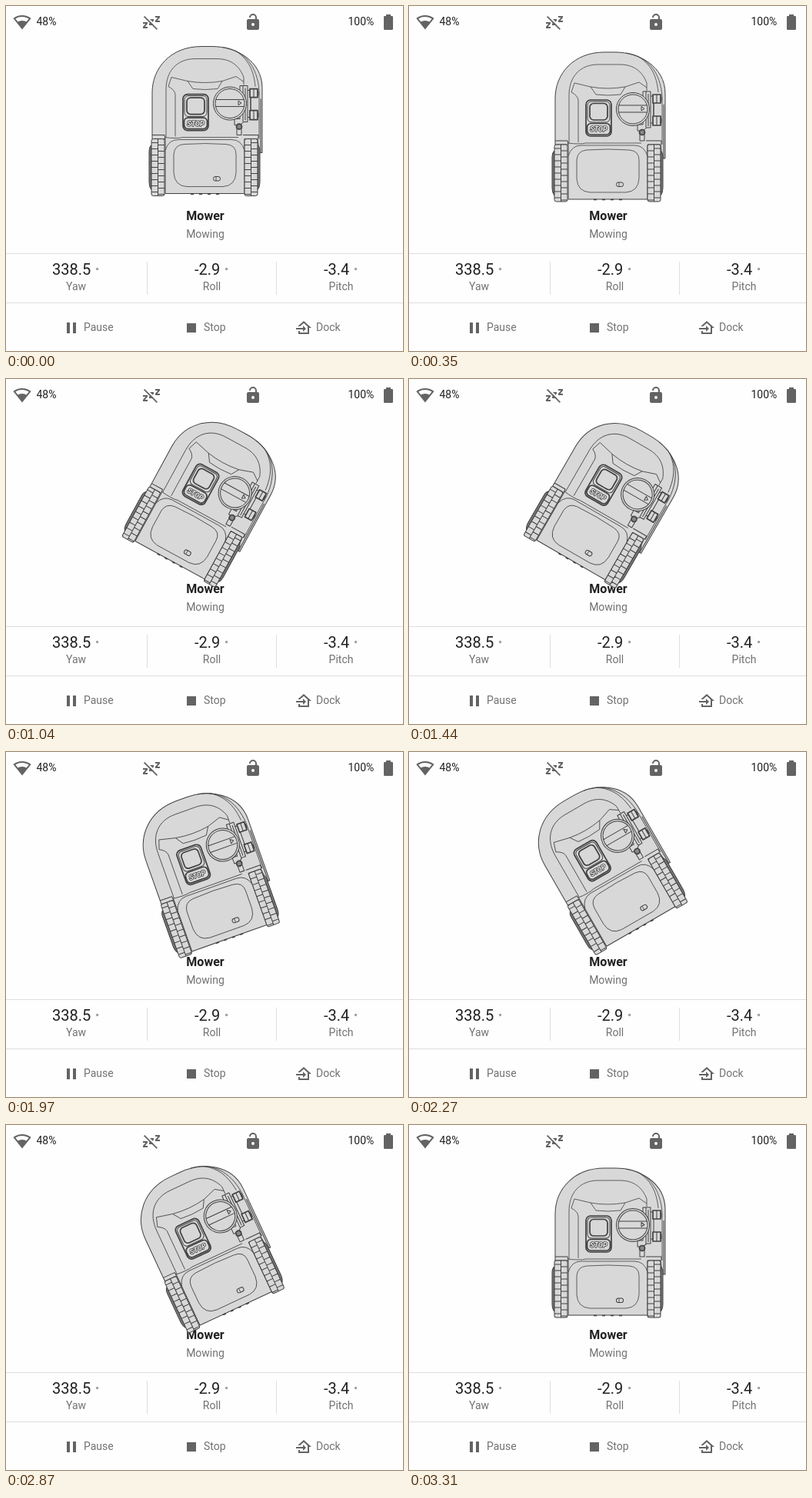
These frames come from a looping animation (516 by 448 pixels, 4390 ms). An HTML page:

```html
<!DOCTYPE html>
<html lang="en">
<head>
<meta charset="utf-8">
<title>Mower card</title>
<style>
html, body { margin: 0; height: 100%; overflow: hidden; background: #fefefe; }
svg { display: block; width: 516px; height: 448px; }
text { font: 14px Roboto, sans-serif; fill: #727272; }
.dark { fill: #212121; }
.name { font-size: 16px; font-weight: 700; }
.value { font-size: 20px; fill: #212121; }
.unit { font-size: 11px; fill: #444; }
.mid { text-anchor: middle; }
.icon { fill: #636363; }
.rule { stroke: #dedede; fill: none; }
#mower { fill: #d8d8d8; stroke: #404040; stroke-width: 1; stroke-linejoin: round; }
#mower .line { fill: none; }
#mower .thin { fill: none; stroke-width: .8; }
#mower .bold { stroke-width: 1.7; }
#mower text { font: italic 700 9px Roboto, sans-serif; fill: #eee; stroke-width: 1.6; paint-order: stroke; }
</style>
</head>
<body>
<svg viewBox="0 0 516 448">
  <defs>
    <g id="wheel">
      <path d="M0 8Q-3 10-3 16V56Q-3 63 0 66Z" fill="#777"/>
      <rect width="17" height="74" rx="2.5"/>
      <path class="line" id="tread"/>
    </g>
  </defs>

  <g class="icon">
    <path transform="translate(9 9)" d="M12 3C7.8 3 3.7 4.4.4 7L12 21.5 23.65 7C20.3 4.4 16.2 3 12 3M12 5C15 5 18 5.9 20.7 7.45L17.5 11.43C16.26 10.74 14.37 10 12 10S7.74 10.75 6.5 11.43L3.27 7.44C5.9 5.85 8.9 5 12 5Z"/>
    <g transform="translate(177 9)">
      <path d="M23 12H17V10L20.4 6H17V4H23V6L19.6 10H23ZM15 16H9V14L12.4 10H9V8H15V10L11.6 14H15ZM7 20H1V18L4.4 14H1V12H7V14L3.6 18H7Z"/>
      <path d="M4 3.5 21 20.5" stroke="#fefefe" stroke-width="2"/>
      <path d="M2.6 4.7 19.4 21.4" stroke="#636363" stroke-width="1.8"/>
    </g>
    <path transform="translate(309 9)" d="M18 8A2 2 0 0 1 20 10V20A2 2 0 0 1 18 22H6A2 2 0 0 1 4 20V10A2 2 0 0 1 6 8H15V6A3 3 0 0 0 9 6H7A5 5 0 0 1 17 6V8ZM12 17A2 2 0 0 0 12 13 2 2 0 0 0 12 17Z"/>
    <path transform="translate(485 9)" d="M16.7 4H15V2H9V4H7.3Q6 4 6 5.3V20.7Q6 22 7.3 22H16.7Q18 22 18 20.7V5.3Q18 4 16.7 4Z"/>
    <path d="M79 411h4v14h-4zM87 411h4v14h-4zM235 412h12v12h-12z"/>
    <path transform="translate(375 406)" d="M15 13 11 9V12H2V14H11V17ZM5 20V16H7V18H17V10.2L12 5.7 7.2 10H4.2L12 3 22 12H19V20Z"/>
  </g>

  <text class="dark" x="39.5" y="25">48%</text>
  <text class="dark" x="444.5" y="25">100%</text>
  <text class="dark name mid" x="259" y="278">Mower</text>
  <text class="mid" x="259" y="301">Mowing</text>
  <path class="rule" d="M0 321.5H516M0 385.5H516M183.5 332V375M351.5 332V375"/>
  <text class="value" x="60" y="349">338.5</text>
  <text class="value" x="245" y="349">-2.9</text>
  <text class="value" x="413" y="349">-3.4</text>
  <g class="mid">
    <text class="unit" x="118.5" y="348">°</text>
    <text class="unit" x="286.5" y="348">°</text>
    <text class="unit" x="454.5" y="348">°</text>
    <text x="91" y="369">Yaw</text>
    <text x="267.5" y="369">Roll</text>
    <text x="435.5" y="369">Pitch</text>
  </g>
  <text x="101" y="422">Pause</text>
  <text x="257" y="422">Stop</text>
  <text x="403" y="422">Dock</text>

  <g id="mower">
    <!-- shell and chassis -->
    <path d="M190 172V112C190 80 214 52 254 52H268C298 52 333 70 333 106V190H329L327 172H310V243H207V172Z"/>
    <path class="thin" d="M282 53C310 57 327 78 329 110V172M297 57C314 67 322 82 324 104"/>
    <path class="thin" d="M208 170V108C208 84 222 68 246 68H274C291 68 303 76 309 92V102"/>
    <path class="line" d="M190 167H206L207 172M308 167H328V172M331 120V190"/>
    <path class="thin" d="M220 169V114Q219 108 211 104L215 92 236 97 243 107Q258 109 275 107L281 97 299 91 309 98M236 97Q258 101 281 97"/>
    <path class="thin" d="M206 170Q222 172 230 170H302M207 187Q211 173 224 173H293Q306 173 310 187"/>
    <path class="thin" d="M231 179Q259 177 286 179Q299 180 299 192V216Q298 233 282 234H235Q219 233 218 216V192Q219 180 231 179Z"/>
    <rect x="269.5" y="221" width="9" height="5.5" rx="2.5"/>
    <path class="thin" d="M273 221V226.5"/>
    <path class="bold" stroke-dasharray="4 7" d="M240 243.5H280"/>

    <!-- stop button -->
    <rect class="bold" x="230" y="114" width="33" height="47" rx="6"/>
    <rect x="232" y="116" width="29" height="27" rx="5"/>
    <rect class="bold" x="235" y="118.5" width="23" height="21.5" rx="5"/>
    <rect class="bold" x="231.5" y="144.5" width="30" height="14.5" rx="5"/>
    <text class="mid" x="246.5" y="155">STOP</text>

    <!-- hinge and dial -->
    <path d="M304 103H314V150H309L304 154H297V146H304Z"/>
    <path class="line" d="M308 103V150M311 106V148M314 109H318V144H314M318 118V134"/>
    <path class="bold" d="M317 107H327V118H317ZM317 135H327V147H317Z"/>
    <path class="line" d="M322 107V118M322 135V147M328 110V116M328 138V144"/>
    <path d="M300 155H306V167H300Z"/>
    <circle class="bold" cx="303" cy="156" r="3.5" fill="#888"/>
    <circle cx="291" cy="126" r="21.5"/>
    <circle cx="291" cy="126" r="19"/>
    <path class="line" d="M272.5 121H309.5M272.5 130H309.5M302 122.5 306 125.5 302 128Z"/>

    <use href="#wheel" transform="translate(189 172)"/>
    <use href="#wheel" transform="translate(327 172) scale(-1 1)"/>
  </g>
</svg>
<script>
const LOOP = 4390;
const mower = document.getElementById("mower");

// Staggered tread blocks
let tread = "M8.5 0V74";
for (let y = 5; y < 72; y += 8) tread += `M0 ${y}H8.5M8.5 ${y + 3}H17`;
document.getElementById("tread").setAttribute("d", tread);

// The pose is refreshed in steps: [first, last, count]
const refreshes = [
  [0, 0, 1], [70, 530, 7], [630, 690, 2], [780, 1110, 6], [1180, 1440, 5], [1500, 1620, 3],
  [1720, 1970, 4], [2030, 2180, 3], [2270, 2270, 1], [2330, 2780, 7], [2870, 2870, 1], [2970, 3310, 6]
].flatMap(([first, last, count]) =>
  Array.from({ length: count }, (_, i) => first + (last - first) * i / Math.max(1, count - 1)));

const clamp = x => Math.min(1, Math.max(0, x));
const smooth = x => (1 - Math.cos(Math.PI * clamp(x))) / 2;

// cubic-bezier(.25, .1, .25, 1)
function ease(x) {
  const curve = (s, a, b) => 3 * (1 - s) ** 2 * s * a + 3 * (1 - s) * s * s * b + s ** 3;
  let low = 0, high = 1;
  for (let i = 0; i < 20; i++) {
    const s = (low + high) / 2;
    if (curve(s, .25, .25) < x) low = s; else high = s;
  }
  return curve(low, .1, 1);
}

// Turn right, then left, then straight again
const turns = [[597, 30], [1697, -60], [2797, 30]];
const heading = t => turns.reduce((sum, [start, by]) => sum + by * ease(clamp((t - start) / 520)), 0);

// Forward, back, forward and rest before each turn: [time, offset]
const drive = [[-70, 4], [110, -6.5], [260, 9], [510, -7.5], [590, 4]];
function offset(t) {
  const u = t < 3200 ? (t + 70) % 1100 - 70 : 600;
  return drive.slice(1).reduce((y, [time, to], i) => {
    const [from, before] = drive[i];
    return y + (to - before) * smooth((u - from) / (time - from));
  }, drive[0][1]);
}

function draw(now) {
  const elapsed = now % LOOP;
  const t = refreshes.filter(r => r <= elapsed + .01).pop() ?? 0;
  mower.setAttribute("transform",
    `translate(259 152) rotate(${heading(t)}) translate(-259 ${offset(t) - 152})`);
}

const begin = performance.now();
function tick() {
  draw(performance.now() - begin);
  requestAnimationFrame(tick);
}
tick();
</script>
</body>
</html>
```
